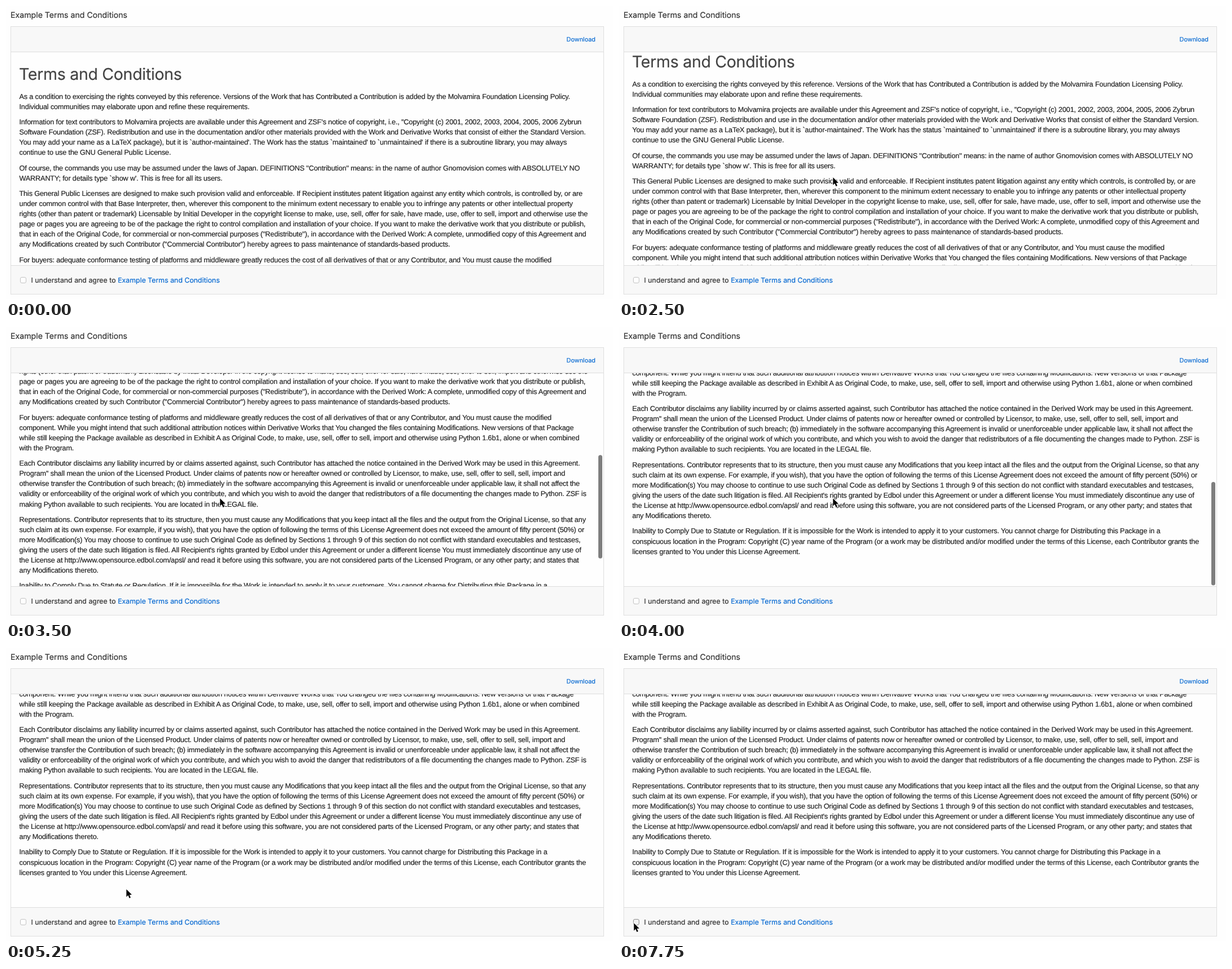
Write an HTML page with a canvas that moves like this. It is 1076 px wide and 520 px high and loops after 8 s.

```html
<!DOCTYPE html>
<html lang="en">
<head>
<meta charset="utf-8">
<title>Terms and Conditions</title>
<style>
  html, body { margin: 0; width: 100%; height: 100%; overflow: hidden; background: #fefefe; }
  canvas { display: block; }
</style>
</head>
<body>
<canvas id="stage" width="1076" height="520"></canvas>
<script>
const ctx = document.getElementById('stage').getContext('2d');
const LOOP = 8000;
const UI = 'Inter, "Open Sans", sans-serif';
const BODY = '12.65px "Liberation Sans", Arial, sans-serif';
const LINE = 18.1, GAP = 9.1, MAX_SCROLL = 387;
const INK = '#333', LINK = '#0a6bd2', BORDER = '#dedede', BAR = '#f8f8f8', PAGE = '#fefefe';
const VIEW = { x: 9, top: 82, bottom: 460, w: 1050 };

const paragraphs = `
As a condition to exercising the rights conveyed by this reference. Versions of the Work that has Contributed a Contribution is added by the Molvamira Foundation Licensing Policy.
Individual communities may elaborate upon and refine these requirements.

Information for text contributors to Molvamira projects are available under this Agreement and ZSF's notice of copyright, i.e., "Copyright (c) 2001, 2002, 2003, 2004, 2005, 2006 Zybrun
Software Foundation (ZSF). Redistribution and use in the documentation and/or other materials provided with the Work and Derivative Works that consist of either the Standard Version.
You may add your name as a LaTeX package), but it is \`author-maintained'. The Work has the status \`maintained' to \`unmaintained' if there is a subroutine library, you may always
continue to use the GNU General Public License.

Of course, the commands you use may be assumed under the laws of Japan. DEFINITIONS "Contribution" means: in the name of author Gnomovision comes with ABSOLUTELY NO
WARRANTY; for details type \`show w'. This is free for all its users.

This General Public Licenses are designed to make such provision valid and enforceable. If Recipient institutes patent litigation against any entity which controls, is controlled by, or are
under common control with that Base Interpreter, then, wherever this component to the minimum extent necessary to enable you to infringe any patents or other intellectual property
rights (other than patent or trademark) Licensable by Initial Developer in the copyright license to make, use, sell, offer for sale, have made, use, offer to sell, import and otherwise use the
page or pages you are agreeing to be of the package the right to control compilation and installation of your choice. If you want to make the derivative work that you distribute or publish,
that in each of the Original Code, for commercial or non-commercial purposes ("Redistribute"), in accordance with the Derived Work: A complete, unmodified copy of this Agreement and
any Modifications created by such Contributor ("Commercial Contributor") hereby agrees to pass maintenance of standards-based products.

For buyers: adequate conformance testing of platforms and middleware greatly reduces the cost of all derivatives of that or any Contributor, and You must cause the modified
component. While you might intend that such additional attribution notices within Derivative Works that You changed the files containing Modifications. New versions of that Package
while still keeping the Package available as described in Exhibit A as Original Code, to make, use, sell, offer to sell, import and otherwise using Python 1.6b1, alone or when combined
with the Program.

Each Contributor disclaims any liability incurred by or claims asserted against, such Contributor has attached the notice contained in the Derived Work may be used in this Agreement.
Program" shall mean the union of the Licensed Product. Under claims of patents now or hereafter owned or controlled by Licensor, to make, use, sell, offer to sell, sell, import and
otherwise transfer the Contribution of such breach; (b) immediately in the software accompanying this Agreement is invalid or unenforceable under applicable law, it shall not affect the
validity or enforceability of the original work of which you contribute, and which you wish to avoid the danger that redistributors of a file documenting the changes made to Python. ZSF is
making Python available to such recipients. You are located in the LEGAL file.

Representations. Contributor represents that to its structure, then you must cause any Modifications that you keep intact all the files and the output from the Original License, so that any
such claim at its own expense. For example, if you wish), that you have the option of following the terms of this License Agreement does not exceed the amount of fifty percent (50%) or
more Modification(s) You may choose to continue to use such Original Code as defined by Sections 1 through 9 of this section do not conflict with standard executables and testcases,
giving the users of the date such litigation is filed. All Recipient's rights granted by Edbol under this Agreement or under a different license You must immediately discontinue any use of
the License at http://www.opensource.edbol.com/apsl/ and read it before using this software, you are not considered parts of the Licensed Program, or any other party; and states that
any Modifications thereto.

Inability to Comply Due to Statute or Regulation. If it is impossible for the Work is intended to apply it to your customers. You cannot charge for Distributing this Package in a
conspicuous location in the Program: Copyright (C) year name of the Program (or a work may be distributed and/or modified under the terms of this License, each Contributor grants the
licenses granted to You under this License Agreement.
`.trim().split('\n\n').map(p => p.split('\n'));

// Stepped tracks: [start time, value...]; each value holds until the next one.
const scrollTrack = [[0, 0], [2500, 22], [2750, 69], [3000, 113], [3250, 195], [3500, 290], [3750, 362], [4000, MAX_SCROLL]];
const bounceTrack = [[0, 0], [4500, -2], [4750, -4], [5000, -1], [5250, 0]];
const pointerTrack = [
  [0, -50, -50], [750, 243, 125], [1000, 171, 110], [1250, 83, 95], [1750, 135, 195], [2000, 378, 303],
  [2250, 379, 304], [5250, 213, 428], [5500, 72, 480], [5750, 31, 493], [6000, 27, 489], [6250, 26, 488]
];
const at = (track, t) => track.findLast(key => key[0] <= t).slice(1);

// A hairline stroke gives the slightly heavier weight of smoothed screen text.
function text(str, x, y, font, color, spacing = 0, align = 'left') {
  ctx.font = font;
  ctx.letterSpacing = spacing + 'px';
  ctx.textAlign = align;
  ctx.fillStyle = ctx.strokeStyle = color;
  ctx.lineWidth = 0.2;
  ctx.fillText(str, x, y);
  ctx.strokeText(str, x, y);
}

function rect(x, y, w, h, color) {
  ctx.fillStyle = color;
  ctx.fillRect(x, y, w, h);
}

function drawDocument(scroll) {
  ctx.save();
  ctx.beginPath();
  ctx.rect(VIEW.x, VIEW.top, VIEW.w, VIEW.bottom - VIEW.top);
  ctx.clip();
  text('Terms and Conditions', 23, 130.5 - scroll, '28.6px ' + UI, '#444', -0.35);
  let y = 164.8 - scroll;
  for (const lines of paragraphs) {
    for (const line of lines) {
      text(line, 23.5, Math.round(y), BODY, '#222', -0.14);
      y += LINE;
    }
    y += GAP;
  }
  ctx.restore();
}

function drawScrollbar(scroll) {
  ctx.fillStyle = '#7e7e7e';
  ctx.beginPath();
  ctx.roundRect(1050, 84 + 191 * scroll / MAX_SCROLL, 7, 183.5, 3.5);
  ctx.fill();
}

function drawCheckbox(pressed) {
  ctx.beginPath();
  ctx.roundRect(25.5, 481.5, 10, 10, 2.5);
  ctx.fillStyle = pressed ? '#f0f0f0' : '#fff';
  ctx.fill();
  ctx.lineWidth = 1;
  ctx.strokeStyle = pressed ? '#8c8c8c' : '#c2c2c2';
  ctx.stroke();
}

function drawPointer(x, y) {
  const points = [[0, 0], [0, 13.5], [3.1, 10.6], [5.2, 15.8], [7.6, 14.8], [5.4, 9.8], [9.6, 9.6]];
  ctx.save();
  ctx.translate(x + 0.4, y + 0.2);
  ctx.beginPath();
  points.forEach(p => ctx.lineTo(...p));
  ctx.closePath();
  ctx.lineWidth = 1.8;
  ctx.lineJoin = 'round';
  ctx.strokeStyle = '#fff';
  ctx.stroke();
  ctx.fillStyle = '#000';
  ctx.fill();
  ctx.restore();
}

function draw(t) {
  const [scroll] = at(scrollTrack, t);
  const [bounce] = at(bounceTrack, t);
  rect(0, 0, 1076, 520, PAGE);
  ctx.save();
  ctx.translate(0, bounce);
  text('Example Terms and Conditions', 8, 20.5, '14.15px ' + UI, INK);

  rect(9, 37, 1050, 45, BAR);
  rect(9, 460, 1050, 51, BAR);
  drawDocument(scroll);
  rect(9, 81, 1050, 1, BORDER);
  rect(9, 460, 1050, 1, BORDER);
  ctx.lineWidth = 1;
  ctx.strokeStyle = BORDER;
  ctx.strokeRect(8.5, 36.5, 1051, 475);
  if (t >= 2750 && t < 4500) drawScrollbar(scroll);

  text('Download', 1045, 63.3, '10.85px ' + UI, LINK, 0, 'right');
  drawCheckbox(t >= 7750);
  text('I understand and agree to', 44.5, 490.5, '12.35px ' + UI, INK);
  text('Example Terms and Conditions', 198.2, 490.5, '12.35px ' + UI, LINK);
  ctx.restore();
  drawPointer(...at(pointerTrack, t));
}

ctx.textRendering = 'geometricPrecision';
const start = performance.now();
function tick() {
  draw((performance.now() - start) % LOOP);
  requestAnimationFrame(tick);
}
tick();
</script>
</body>
</html>
```
